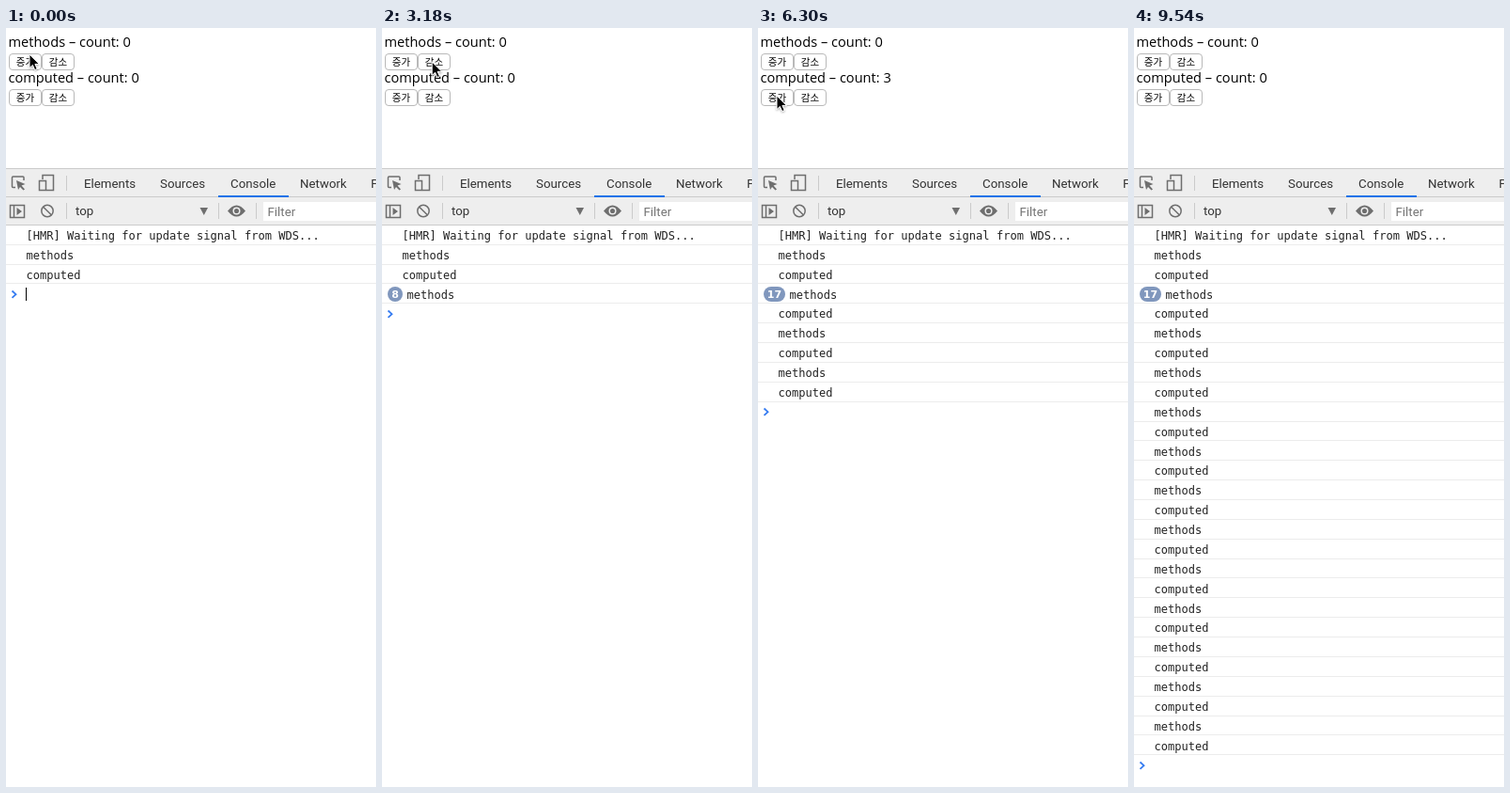
Animation, 394 px wide and 807 px high, one loop 9780 ms. Source, as an HTML page:

```html
<!DOCTYPE html>
<html lang="en">
<head>
<meta charset="utf-8">
<style>
html, body { margin: 0; width: 100%; height: 100%; overflow: hidden; background: #fff; }
svg { display: block; width: 394px; height: 807px; }
text { white-space: pre; }
.page { font: 14.6px "Open Sans", "Noto Sans", sans-serif; }
.label { font: 10.5px "Noto Sans CJK KR", "Noto Sans CJK", sans-serif; text-anchor: middle; }
.ui { font: 13.3px Roboto, sans-serif; fill: #333; }
.log { font: 12.07px "DejaVu Sans Mono", monospace; fill: #222; }
.badge { font: bold 11px "DejaVu Sans", sans-serif; fill: #fff; text-anchor: middle; }
.icon { fill: none; stroke: #6e6e6e; stroke-width: 1.5; }
.solid { fill: #6e6e6e; stroke: none; }
</style>
</head>
<body>
<svg viewBox="0 0 394 807">
  <defs>
    <linearGradient id="blue" x2="0" y2="1">
      <stop stop-color="#3b8cf8"/><stop offset="1" stop-color="#0760e8"/>
    </linearGradient>
    <filter id="shadow" x="-50%" y="-50%" width="200%" height="200%">
      <feDropShadow dx="0" dy="1" stdDeviation="1" flood-opacity=".35"/>
    </filter>
  </defs>
  <rect width="394" height="807" fill="#fff"/>
  <text class="page" id="methods" x="2.500" y="20"></text>
  <g id="buttons"></g>
  <text class="page" id="computed" x="2.500" y="58"></text>

  <path fill="#eee" d="M0 150H394V209H0z"/>
  <path stroke="#cbcbcb" d="M0 149.5H394M0 179.5H394M0 209.5H394M64.5 157V173M64.5 186V203M226.5 186V203M266.5 186V203"/>
  <path fill="#1a73e8" d="M226 178H301V180H226z"/>
  <path fill="#fff" d="M274 185H394V205H274z"/>
  <g class="ui">
    <text x="83" y="170">Elements</text>
    <text x="164" y="170">Sources</text>
    <text x="239" y="170">Console</text>
    <text x="313" y="170">Network</text>
    <text x="388.5" y="170">P</text>
    <text x="74" y="199">top</text>
    <text x="278.5" y="200" fill="#757575">Filter</text>
  </g>
  <g class="icon">
    <path d="M10 169.5H7.5Q6.5 169.5 6.5 168.5V159Q6.5 158 7.5 158H18Q19 158 19 159V162"/>
    <path class="solid" d="M11 162L20.5 166L16.5 167.5L20 171.5L18.5 172.5L15 169L13 172z"/>
    <path d="M39 161V156.5H50.5V172.5H43M35.5 162.5H42.5V172.5H35.5z"/>
    <path d="M4.5 188.5H19.5V201.5H4.5zM8.5 188V202"/>
    <path class="solid" d="M11.5 191L17 195L11.5 199z"/>
    <circle cx="44" cy="194.5" r="6.2"/>
    <path d="M39.7 190.2L48.3 198.8"/>
    <path class="solid" d="M206.5 191H215L210.75 199z"/>
    <path class="solid" d="M236 194.5Q245.5 182.5 255 194.5Q245.5 206.5 236 194.5z"/>
    <circle cx="245.5" cy="194.5" r="3.3" stroke="#eee" fill="#6e6e6e"/>
  </g>

  <g id="log"></g>
  <g id="prompt">
    <path d="M6.5 -3.5L10.5 .2L6.5 3.9" fill="none" stroke="#367cf1" stroke-width="1.8"/>
    <path id="caret" d="M21.5 -7V7" stroke="#000"/>
  </g>
  <path id="cursor" filter="url(#shadow)" stroke="#fff"
    d="M0 0V14.5L3.4 11.4L5.7 16.6L8.2 15.5L5.9 10.4H10.5z"/>
</svg>
<script>
const LOOP = 9780, PITCH = 20.87, PRESS = 120, METHOD_CLICKS = 16;

// Evenly spaced clicks on one button, with the pointer tip resting at x, y
const bursts = [
  { start: 560, gap: 390, count: 4, step: 1, x: 22, y: 31 },
  { start: 2160, gap: 300, count: 4, step: -1, x: 57, y: 36 },
  { start: 3500, gap: 180, count: 4, step: 1, x: 19, y: 35 },
  { start: 4560, gap: 160, count: 4, step: -1, x: 56, y: 36 },
  { start: 5640, gap: 300, count: 4, step: 1, x: 20, y: 72 },
  { start: 6800, gap: 240, count: 4, step: -1, x: 47, y: 74 },
  { start: 8090, gap: 180, count: 2, step: 1, x: 13, y: 75 },
  { start: 8820, gap: 240, count: 2, step: -1, x: 47, y: 74 }
];
const clicks = bursts.flatMap(({ start, gap, count, step }) =>
  Array.from({ length: count }, (_, i) => ({ time: start + gap * i, step })));
const stops = [
  { arrive: 0, leave: 180, x: 25, y: 28 },
  ...bursts.map(({ start, gap, count, x, y }) =>
    ({ arrive: start - 150, leave: start + gap * (count - 1) + 80, x, y })),
  { arrive: 9340, leave: LOOP, x: -20, y: 78 }
];

const $ = id => document.getElementById(id);

function make(parent, tag, attrs, text = "") {
  const el = document.createElementNS("http://www.w3.org/2000/svg", tag);
  for (const key in attrs) el.setAttribute(key, attrs[key]);
  el.textContent = text;
  return parent.appendChild(el);
}

const buttons = [27, 65].map(y => ["증가", "감소"].map((label, i) => {
  const x = 3.5 + 35 * i;
  const box = make($("buttons"), "rect", { x, y: y + .5, width: 34, height: 17, rx: 3.5 });
  make($("buttons"), "text", { class: "label", x: x + 17, y: y + 13, lang: "ko" }, label);
  return box;
}));

function logLines(done) {
  const lines = ["[HMR] Waiting for update signal from WDS...", "methods", "computed"];
  if (done) lines.push("methods");
  for (let i = METHOD_CLICKS; i < done; i++) {
    if (i > METHOD_CLICKS) lines.push("methods");
    lines.push("computed");
  }
  return lines;
}

function drawLog(done) {
  const log = $("log"), lines = logLines(done);
  const repeats = Math.min(done, METHOD_CLICKS + 1);
  log.replaceChildren();
  lines.forEach((line, row) => {
    const y = Math.round(221 + PITCH * row), edge = Math.floor(230.2 + PITCH * row) + .5;
    let x = 21.5;
    if (row === 3 && repeats > 1) {
      const width = repeats > 9 ? 23 : 16;
      make(log, "rect", { x: 6, y: y - 9, width, height: 16, rx: 8, fill: "#8097bd" });
      make(log, "text", { class: "badge", x: 6 + width / 2, y: y + 3 }, repeats);
      x = width + 10.5;
    }
    make(log, "text", { class: "log", x, y: y + 4 }, line);
    make(log, "path", { d: `M0 ${edge}H394`, stroke: "#ececec" });
  });
  $("prompt").setAttribute("transform", `translate(0 ${Math.round(220.5 + PITCH * lines.length)})`);
}

function pointer(t) {
  const i = stops.findIndex(stop => t < stop.leave);
  const to = stops[i], from = stops[Math.max(0, i - 1)];
  if (t >= to.arrive) return [to.x, to.y];
  const u = (t - from.leave) / (to.arrive - from.leave), e = u * u * (3 - 2 * u);
  return [from.x + (to.x - from.x) * e, from.y + (to.y - from.y) * e];
}

const total = list => list.reduce((sum, click) => sum + click.step, 0);

let shown = -1;
function render(t) {
  const done = clicks.filter(click => click.time <= t).length;
  if (done !== shown) {
    shown = done;
    const past = clicks.slice(0, done);
    $("methods").textContent = `methods – count: ${total(past.slice(0, METHOD_CLICKS))}`;
    $("computed").textContent = `computed – count: ${total(past.slice(METHOD_CLICKS))}`;
    drawLog(done);
  }
  const next = clicks[done];
  const pressed = next && t >= next.time - PRESS;
  const active = pressed ? buttons[+(done >= METHOD_CLICKS)][+(next.step < 0)] : null;
  for (const box of buttons.flat()) {
    box.setAttribute("fill", box === active ? "url(#blue)" : "#fff");
    box.setAttribute("stroke", box === active ? "#1763d6" : "#b9b9b9");
  }
  $("caret").style.display = t < clicks[0].time - PRESS ? "" : "none";
  $("cursor").setAttribute("transform", `translate(${pointer(t)})`);
}

const origin = performance.now();
function tick() {
  render((performance.now() - origin) % LOOP);
  requestAnimationFrame(tick);
}
tick();
</script>
</body>
</html>
```
